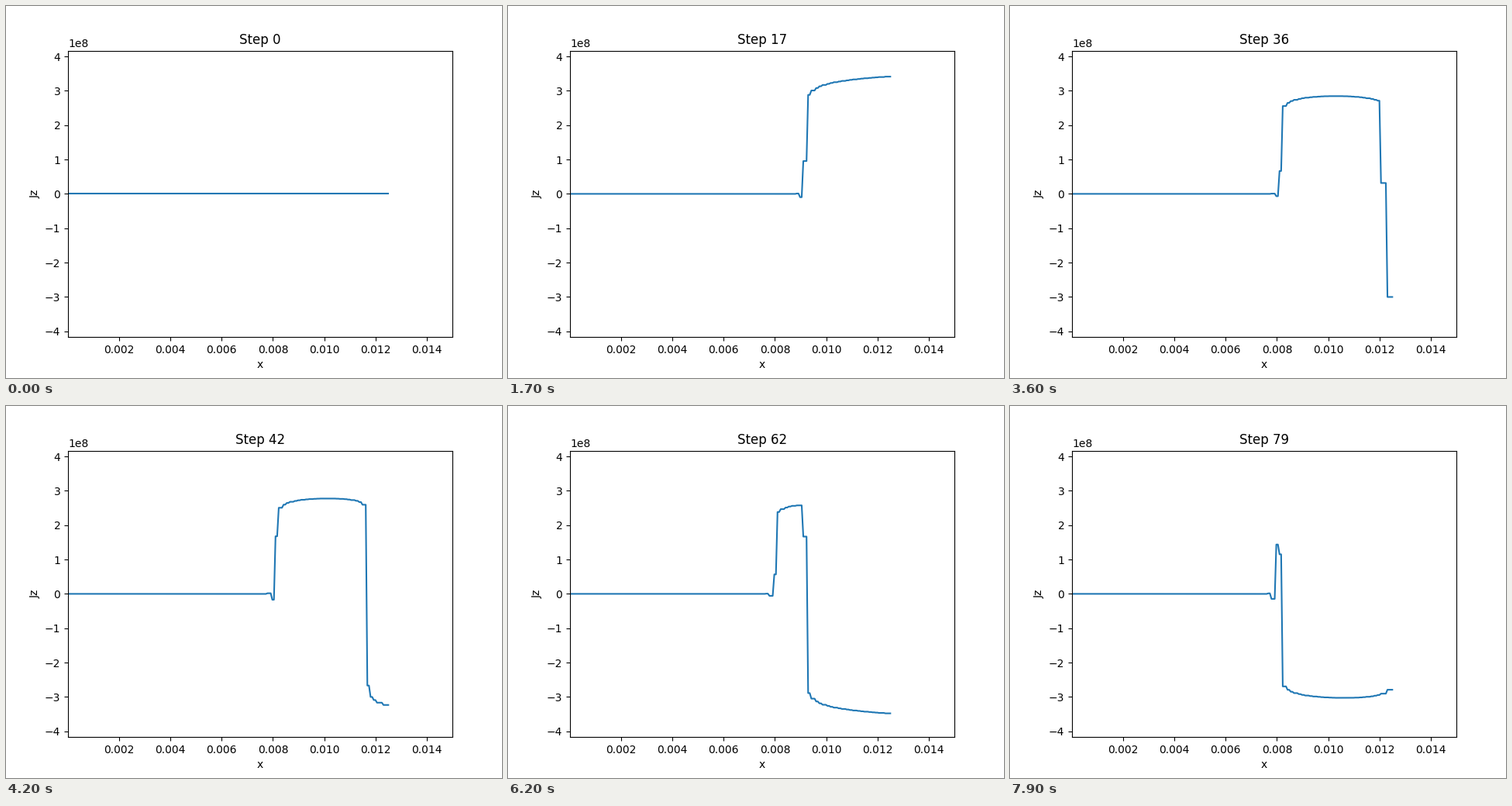
These frames come from a looping animation (640x480 px, 8000 ms). A matplotlib script:

```python
import numpy as np
import matplotlib.pyplot as plt
from matplotlib.animation import FuncAnimation

# Current density in a superconductor with E ~ J**N_EXP, driven by a sine.
# Lengths in mm, J in 1e8 A/m2, time in steps.
STEPS, PERIOD, SUBSTEPS = 80, 100, 2
RADIUS, SAMPLES = 12.5, 200
N_EXP, J_C, E_C = 20, 3.0, 0.091
H_PEAK = 10.92
SHAPE = 0.83  # between a slab (0) and a round wire (1)

# Cell edges in units of the sample index; the outermost cells are wider
edges = np.append(128.4 + 2.368 * np.arange(-8, 27), [191.5, 195.5, 199])
r = edges * RADIUS / (SAMPLES - 1)
cells = len(r) - 1
width = np.diff(r)
weight = (r / RADIUS) ** SHAPE
mid = ((r[1:] + r[:-1]) / 2 / RADIUS) ** SHAPE
volume = mid * width

# J = curl @ H
curl = np.zeros((cells, cells + 1))
idx = np.arange(cells)
curl[idx, idx] = -weight[:-1] / volume
curl[idx, idx + 1] = weight[1:] / volume

mass = np.zeros((cells + 1, cells + 1))
mass[idx, idx + 1] = mass[idx + 1, idx] = volume / 12
node = np.zeros(cells + 1)
node[:-1] += volume / 2
node[1:] += volume / 2
mass[np.diag_indices(cells + 1)] = node * 10 / 12

# Scale H by its node weight so that the stored flux matches the curl
mass *= np.sqrt(np.outer(weight / np.append(mid, mid[-1]),
                         weight / np.append(mid, mid[-1])))
free = slice(1, cells)


def energy(h, old, dt):
    j = np.abs(curl @ h) / J_C
    d = h - old
    stored = E_C * J_C / (N_EXP + 1) * volume @ j ** (N_EXP + 1)
    return stored + d @ mass @ d / (2 * dt)


def advance(old, surface, dt):
    """One implicit step: damped Newton on a convex energy."""
    h = old.copy()
    h[-1] = surface
    for _ in range(80):
        j = curl @ h / J_C
        e = E_C * np.sign(j) * np.abs(j) ** N_EXP
        slope = E_C * N_EXP / J_C * np.abs(j) ** (N_EXP - 1)
        grad = (curl.T @ (volume * e) + mass @ (h - old) / dt)[free]
        hess = (curl.T * (volume * slope)) @ curl + mass / dt
        move = np.zeros_like(h)
        move[free] = -np.linalg.solve(hess[free, free], grad)
        if np.abs(move).max() < 1e-8:
            break
        start, gain, t = energy(h, old, dt), grad @ move[free], 1.0
        while t > 1e-6 and energy(h + t * move, old, dt) > start + 1e-4 * t * gain:
            t /= 2
        h += t * move
    return h


def simulate():
    h = np.zeros(cells + 1)
    out = [curl @ h]
    for k in range(1, STEPS):
        for s in range(1, SUBSTEPS + 1):
            t = k - 1 + s / SUBSTEPS
            h = advance(h, H_PEAK * np.sin(2 * np.pi * t / PERIOD), 1 / SUBSTEPS)
        out.append(curl @ h)
    return np.array(out) * 1e8


profiles = simulate()
x = np.linspace(0, RADIUS / 1000, SAMPLES)
cell_of = np.clip(np.searchsorted(edges, np.arange(SAMPLES)) - 1, 0, cells - 1)

fig, ax = plt.subplots(figsize=(6.4, 4.8), dpi=100)
line, = ax.plot(x, np.zeros(SAMPLES))
ax.set_xlim(1e-5, 0.015)
ax.set_ylim(-4.17e8, 4.17e8)
ax.set_xlabel("x")
ax.set_ylabel("Jz")
title = ax.set_title("Step 0")


def update(k):
    line.set_ydata(profiles[k][cell_of])
    title.set_text(f"Step {k}")
    return line, title


anim = FuncAnimation(fig, update, frames=STEPS, interval=100, repeat=True)
plt.show()
```
